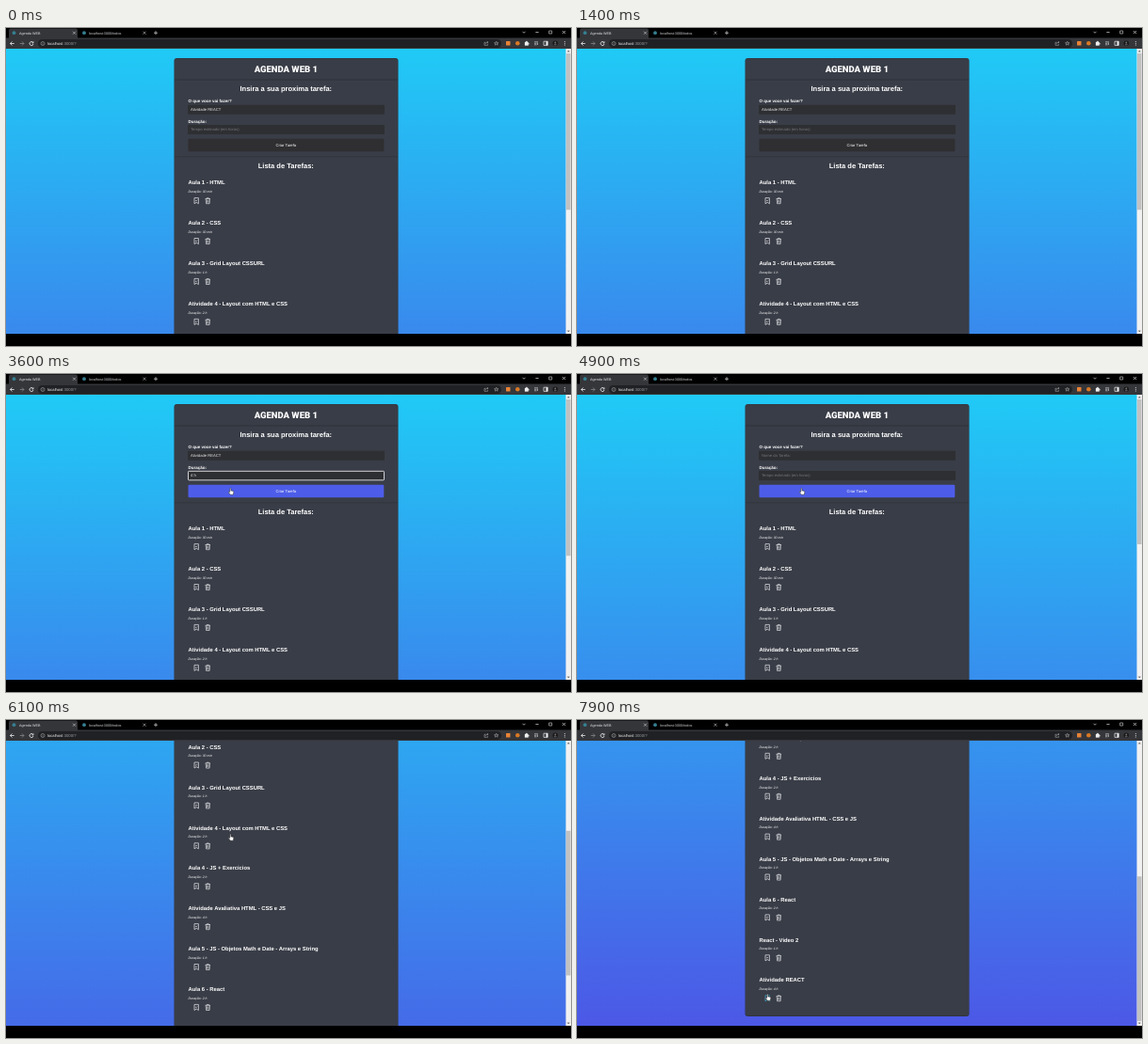
An HTML page with a canvas that plays this animation: 600 by 338 pixels, repeating every 8000 ms.

```html
<!DOCTYPE html>
<html lang="pt-BR">
<head>
<meta charset="utf-8">
<title>Agenda WEB</title>
<style>
html, body { margin: 0; width: 100%; height: 100%; overflow: hidden; background: #000; }
canvas { display: block; width: 600px; height: 338px; }
</style>
</head>
<body>
<canvas width="600" height="338"></canvas>
<script>
const canvas = document.querySelector("canvas");
const ctx = canvas.getContext("2d");
const ratio = window.devicePixelRatio || 1;
canvas.width = 600 * ratio;
canvas.height = 338 * ratio;
ctx.textRendering = "geometricPrecision";

const LOOP = 8000, STEP = 100;
const TOP = 22, BOTTOM = 325, VIEW = BOTTOM - TOP;
const ROW = 42.9, PAGE = 534;
const SANS = '"Liberation Sans", Arial, sans-serif';
const WHITE = "#fff", CARD = "#393d47", FIELD = "#2e2f32", BLUE = "#4d5de9";

const T = { focus: 1600, type: 2100, space: 2500, typed: 2700, hover: 3100, click: 4300, add: 4700, iconHover: 7700 };

const tasks = [
  ["Aula 1 - HTML", "30 min"],
  ["Aula 2 - CSS", "30 min"],
  ["Aula 3 - Grid Layout CSSURL", "1 h"],
  ["Atividade 4 - Layout com HTML e CSS", "2 h"],
  ["Aula 4 - JS + Exercicios", "2 h"],
  ["Atividade Avaliativa HTML - CSS e JS", "4 h"],
  ["Aula 5 - JS - Objetos Math e Date - Arrays e String", "1 h"],
  ["Aula 6 - React", "2 h"],
  ["React - Video 2", "1 h"],
  ["Atividade REACT", "4 h"]
];

// [time, value] points, linear in between
const scrollKeys = [[5700, 0], [5800, 20], [6100, 178.5], [6300, 240], [6600, 268.3], [6800, 274]];
const mouseX = [[7100, 239], [7400, 222], [7700, 203]];
const mouseY = [[7100, 125], [7400, 225], [7700, 295]];

function track(keys, t) {
  if (t <= keys[0][0]) return keys[0][1];
  for (let i = 1; i < keys.length; i++) {
    const [t0, a] = keys[i - 1], [t1, b] = keys[i];
    if (t <= t1) return a + (b - a) * (t - t0) / (t1 - t0);
  }
  return keys[keys.length - 1][1];
}

function rect(x, y, w, h, color, r = 0) {
  ctx.fillStyle = color;
  ctx.beginPath();
  ctx.roundRect(x, y, w, h, r);
  ctx.fill();
}

function outline(x, y, w, h, color, width = 0.6, r = 0) {
  ctx.strokeStyle = color;
  ctx.lineWidth = width;
  ctx.beginPath();
  ctx.roundRect(x, y, w, h, r);
  ctx.stroke();
}

function dot(x, y, r, color) {
  ctx.fillStyle = color;
  ctx.beginPath();
  ctx.arc(x, y, r, 0, Math.PI * 2);
  ctx.fill();
}

// Strokes an SVG path moved to x, y
function path(d, x, y, color, width = 0.7, fill) {
  const p = new Path2D(d);
  ctx.save();
  ctx.translate(x, y);
  if (fill) { ctx.fillStyle = fill; ctx.fill(p); }
  ctx.strokeStyle = color;
  ctx.lineWidth = width;
  ctx.stroke(p);
  ctx.restore();
}

// y is the middle of the capitals
function text(s, x, y, size, { color = WHITE, style = "", align = "left", font = SANS } = {}) {
  ctx.font = `${style} ${size}px ${font}`;
  ctx.textAlign = align;
  ctx.fillStyle = color;
  ctx.fillText(s, x, y + size * 0.355);
}

function browser() {
  rect(0, 0, 600, 11, "#000");
  rect(3, 0.5, 73, 12, "#35363a", [2, 2, 0, 0]);
  rect(0, 10.5, 600, 11.5, "#35363a");
  rect(34, 12, 492, 9, "#202124", 4.5);

  dot(8.5, 5.2, 1.9, "#357f91");
  text("Agenda WEB", 14, 5.2, 3.75, { color: "#e4e5e8" });
  dot(83, 5.2, 1.9, "#357f91");
  text("localhost:3000/todos", 88, 5.2, 3.75, { color: "#d0d2d6" });
  const cross = "M-1.5-1.5L1.5 1.5M1.5-1.5L-1.5 1.5";
  path(cross, 72.5, 5.2, "#ddd", 0.6);
  path(cross, 147, 5.2, "#ccc", 0.6);
  path("M-2 0H2M0-2V2", 159, 5.2, "#ddd", 0.7);
  path("M-1.5-.7L0 .8L1.5-.7", 550, 4.5, "#ddd");
  path("M-1.6 0H1.6", 564, 4.5, "#ddd");
  outline(576.7, 3, 3, 3, "#ddd");
  path(cross, 592.5, 4.5, "#ddd");

  const arrow = "M2.2 0H-2M0-2L-2 0L0 2";
  path(arrow, 6.5, 16.5, "#eee", 0.8);
  path("M-2.2 0H2M0-2L2 0L0 2", 17, 16.5, "#85868a", 0.8);
  path("M1.6-1.2A2 2 0 1 0 2 .4M2-2.2V-.6H.4", 27, 16.5, "#eee", 0.8);
  path("M2 0A2 2 0 1 1-2 0A2 2 0 1 1 2 0M0-.3V1.1M0-1.2V-.8", 39, 16.5, "#bbb", 0.5);
  text("localhost", 44, 16.4, 4.2, { color: "#f2f2f2" });
  text(":3000/?", 44 + ctx.measureText("localhost").width, 16.4, 4.2, { color: "#9aa0a6" });

  path("M-.5-1H-2V2H1.6V.8M-.8.8C-.6-.7.2-1.1 2-1.1M.9-2.2L2.1-1.1L.9 0", 510, 16.3, "#bbb", 0.5);
  path("M0-2.2L.6-.7L2.2-.6L1-.1V.1L1.4 1.8L0 .9L-1.4 1.8L-1 .2L-2.2-.6L-.6-.7Z", 520.7, 16.4, "#bbb", 0.5);
  rect(531, 14, 4.5, 4.5, "#e78236", 0.5);
  dot(543.3, 16.3, 2.3, "#d77825");
  path("M-2-1.2H-.8V-2.2H.5V-1.2H1.5V0H2.4V1H1.5V2.2H-2Z", 553, 16.3, "#eee", 0.3, "#eee");
  path("M-2-1.5H2M-2 0H.5M-2 1.5H.5M1.5-.8V1.7", 563, 16.3, "#ddd", 0.6);
  outline(571, 14.2, 4.2, 4.2, "#eee", 0.7);
  rect(573.5, 14.2, 1.7, 4.2, "#eee");
  dot(583.3, 16.3, 2.8, "#19191b");
  dot(583.3, 15.5, 0.9, "#77716f");
  rect(581.9, 16.8, 2.8, 1.7, "#55545a", 0.8);
  for (const dy of [-1.8, 0, 1.8]) dot(593.3, 16.3 + dy, 0.5, "#eee");
}

function scrollbar(scroll, page) {
  rect(594.5, TOP, 5.5, VIEW, "#f1f1f1");
  const span = VIEW - 10;
  rect(595, TOP + 5 + span * scroll / page, 4.5, span * VIEW / page, "#c1c1c1");
  path("M-1.2.7L0-.7L1.2.7Z", 597.3, TOP + 2.6, "#505050", 0.2, "#505050");
  path("M-1.2-.7L0 .7L1.2-.7Z", 597.3, BOTTOM - 2.6, "#505050", 0.2, "#505050");
}

function field(y, value, hint, focused) {
  rect(193, y, 209, 10, FIELD, 0.8);
  if (focused) outline(193.5, y + 0.3, 208, 9.5, "#e5e5e8", 0.9, 0.8);
  text(value || hint, 196, y + 4.8, 4.17, { color: value ? "#e6e6e6" : "#737579" });
}

function task([title, time], y, hot) {
  text(title, 193.5, y, 5.85, { style: "bold" });
  text("Duração: " + time, 193.5, y + 9.4, 3.5, { style: "italic" });
  path("M-2.2-3.1H2.2V3L0 1.6L-2.2 3ZM-1-.5L-.2.2L1-1", 202.2, y + 19.4, hot ? "#3fa9d0" : "#e8e9ec", 0.7);
  path("M-2.7-2.2H2.7M-1-2.2V-3H1V-2.2M-2.1-2.2L-1.8 3H1.8L2.1-2.2M-.8-1V2M.8-1V2", 214.3, y + 19.4, "#e8e9ec", 0.65);
}

function form(t) {
  const cleared = t >= T.add;
  text("AGENDA WEB 1", 297.3, 44, 9.5, { style: "900", align: "center", font: "Roboto, sans-serif" });
  rect(179, 54.6, 237, 0.8, "#2f323a");
  text("Insira a sua proxima tarefa:", 297.3, 64.3, 7.5, { style: "bold", align: "center" });
  text("O que voce vai fazer?", 193.5, 77.5, 4.5, { style: "bold" });
  field(81.7, cleared ? "" : "Atividade REACT", "Nome da Tarefa:", false);
  text("Duração:", 193.5, 99, 4.5, { style: "bold" });
  const typed = t < T.type || cleared ? "" : t < T.space ? "4" : t < T.typed ? "4 " : "4 h";
  field(103, typed, "Tempo estimado (em horas)", t >= T.focus && t < T.click);

  const hot = t >= T.hover && t < 6000;
  rect(193.5, 117.8, 207.8, 13.4, hot ? BLUE : "#2f2e31", 1);
  text("Criar Tarefa", 297.3, 124.5, 4.17, { align: "center" });
  rect(179, 136.5, 237, 0.8, "#30333b");
  text("Lista de Tarefas:", 297.3, 146, 7.5, { style: "bold", align: "center" });
}

function page(t) {
  const added = t >= T.add;
  const height = PAGE + (added ? ROW : 0);
  const scroll = track(scrollKeys, t);

  ctx.save();
  ctx.beginPath();
  ctx.rect(0, TOP, 600, VIEW);
  ctx.clip();
  ctx.save();
  ctx.translate(0, -scroll);
  const sky = ctx.createLinearGradient(0, TOP, 0, TOP + height);
  sky.addColorStop(0, "rgb(32,202,246)");
  sky.addColorStop(1, "rgb(76,88,230)");
  rect(0, TOP, 600, height + 1, sky);

  const end = TOP + height - 10;
  rect(178.5, 32, 238, end - 32, "#30343c", 3);
  rect(179, 32.4, 237, end - 33.2, CARD, 2.5);
  form(t);
  const count = added ? tasks.length : tasks.length - 1;
  for (let i = 0; i < count; i++) {
    task(tasks[i], 164.3 + i * ROW, i === 9 && t >= T.iconHover);
  }
  ctx.restore();
  scrollbar(scroll, height);
  ctx.restore();
}

function hand(t) {
  if (t < T.hover) return;
  path("M-1.2-3.4C-.9-4-.2-4-.1-3.3V-1.1L2.2-.6Q2.9-.4 2.8.4L2.3 3.2H-.7L-2.6.8C-3 .1-2.2-.3-1.2.6Z",
    track(mouseX, t), track(mouseY, t), "#222", 0.5, WHITE);
}

function draw(now) {
  const t = Math.floor((now % LOOP) / STEP) * STEP;
  ctx.setTransform(ratio, 0, 0, ratio, 0, 0);
  rect(0, 0, 600, 338, "#000");
  page(t);
  browser();
  hand(t);
}

const start = performance.now();
function loop() {
  draw(performance.now() - start);
  requestAnimationFrame(loop);
}
loop();
</script>
</body>
</html>
```
